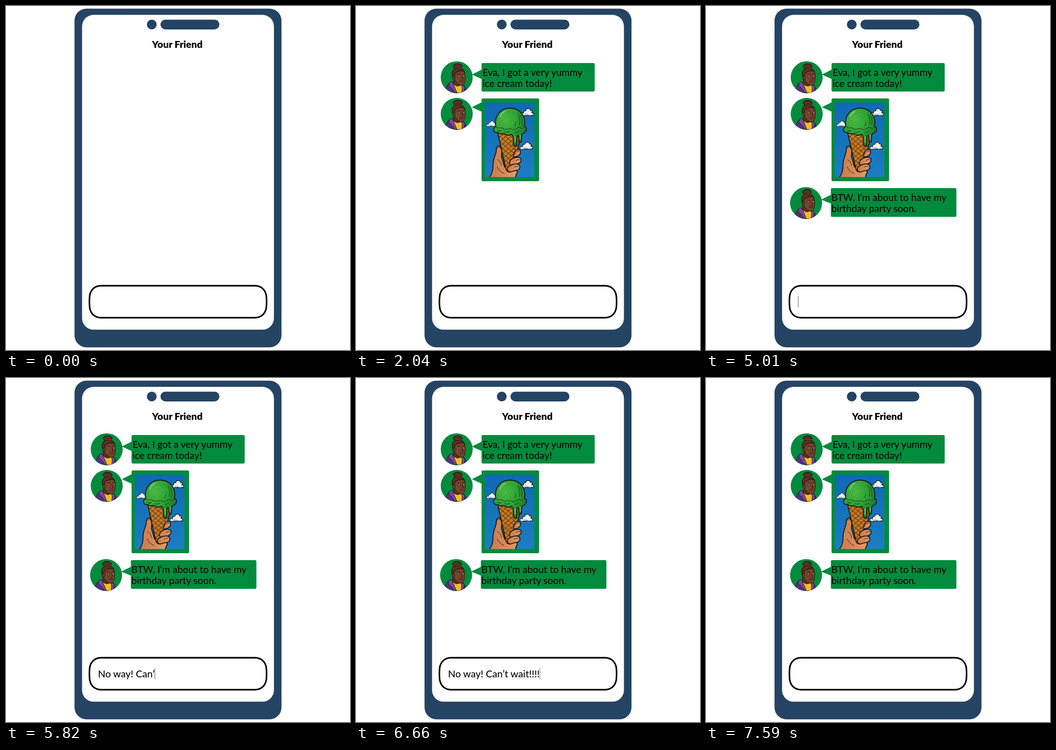
These frames come from a looping animation (748x748 px, 8 s). An HTML page:

```html
<!DOCTYPE html>
<html lang="en">
<head>
<meta charset="utf-8">
<title>Chat</title>
<style>
  html, body { margin: 0; width: 100%; height: 100%; overflow: hidden; background: #fff; }
  svg { display: block; width: 100vw; height: 100vh; }
  text { font: 500 21px Lato, sans-serif; fill: #080808; white-space: pre; }
  .title { font-weight: 900; font-size: 21.3px; text-anchor: middle; fill: #000; }
  .navy { fill: #254463; }
  .green { fill: #038b3d; }
  .ink { stroke: #15100d; stroke-linejoin: round; stroke-linecap: round; }
  .line { fill: none; }
  .message { visibility: hidden; }
  #reply { font-size: 21.3px; }
</style>
</head>
<body>
<svg viewBox="0 0 748 748">
  <defs>
    <clipPath id="disc"><circle r="34.5"/></clipPath>
    <clipPath id="photo"><rect x="280" y="210" width="108" height="162"/></clipPath>
    <linearGradient id="sky" x2="0" y2="1">
      <stop stop-color="#0f69b4"/><stop offset="1" stop-color="#1b7dc2"/>
    </linearGradient>
    <radialGradient id="mint" cx=".35" cy=".3" r=".75">
      <stop stop-color="#4cb944"/><stop offset=".5" stop-color="#2fa236"/><stop offset="1" stop-color="#187427"/>
    </radialGradient>
    <linearGradient id="skin">
      <stop stop-color="#c8794a"/><stop offset="1" stop-color="#e09a68"/>
    </linearGradient>
    <pattern id="waffle" width="8" height="8" patternUnits="userSpaceOnUse" patternTransform="rotate(40) skewX(-8)">
      <rect width="8" height="8" fill="#c57a24"/>
      <path d="M0 0H8M0 0V8" stroke="#573009" stroke-width="2.2"/>
    </pattern>

    <g id="avatar">
      <circle r="34.8" class="green"/>
      <g clip-path="url(#disc)" class="ink" stroke-width=".9">
        <path fill="#4f3479" d="M-26 35C-24 25-22 16-13 10L-7 14 2 33 9 24 11 14C17 17 21 24 22 35Z"/>
        <path fill="#7a489d" d="M-13 10C-18 13-19 19-12 23L-3 34 2 33-7 13ZM11 14 18 21 15 34H10L9 24Z"/>
        <path fill="#f2bd20" d="M-8 13C-3 19 4 20 9 15L12 22 11 34H1Z"/>
        <path fill="#5b2f20" d="M-7 0-8 13C-3 20 4 21 9 16V8Z"/>
        <path fill="#4a261e" d="M-8 2C-13-9-9-18-1-21 8-23 15-19 18-10L8-8Z"/>
        <ellipse cx="2" cy="-24" rx="10" ry="6" fill="#4a261e"/>
        <path fill="#74422b" d="M-4-7C0-13 8-15 16-13L19-4 18 8C17 14 14 18 10 18 4 17-4 10-6 3Z"/>
        <ellipse cx="-6" cy="1" rx="2.6" ry="4" fill="#70402a"/>
        <path class="line" stroke="#8b4b32" d="M-6-23Q1-28 9-24M-4-20Q2-24 11-20M-8-12Q-2-19 9-18M-8-6Q-6-14 4-16"/>
        <path class="line" d="M2-7 8-6M13-7 17-7M12-3 14 3 11 5"/>
        <path fill="#fff" stroke-width=".6" d="M3-3Q6-5 9-2 6 0 3-3M13-3 17-4 16-1Z"/>
        <circle cx="7" cy="-2.5" r=".6" fill="#15100d"/>
        <path fill="#9b4036" stroke-width=".6" d="M7 9Q11 7 15 8 12 12 7 9Z"/>
        <path class="line" stroke="#a05a38" d="M-1 2Q2 8 4 10"/>
      </g>
    </g>

    <g id="cloud" class="ink" stroke-width="1.3">
      <path fill="#f4f3ea" d="M-14 5C-13 1-9 1-8 2-8-3-4-4-3-3-2-10 7-9 7-4 11-5 12 0 10 1 14 1 15 4 14 7H-5C-8 9-12 8-14 5Z"/>
      <path class="line" stroke="#89b9d6" stroke-width="1.5" d="M-8 5Q-2 2 2 5T11 5"/>
    </g>
  </defs>

  <rect class="navy" x="149" y="5.700" width="450" height="736.500" rx="26"/>
  <rect x="165.400" y="19.300" width="417.200" height="684.500" rx="25" fill="#fff"/>
  <circle class="navy" cx="317" cy="40.3" r="10.6"/>
  <rect class="navy" x="336" y="29.700" width="128" height="21.200" rx="10.6"/>
  <text class="title" x="372.5" y="91.3">Your Friend</text>

  <g class="message" data-at="930">
    <use href="#avatar" x="219" y="155"/>
    <path class="green" d="M252 149 274 138V159Z"/>
    <rect class="green" x="273" y="124" width="246" height="62" rx="3"/>
    <text x="275" y="151.5">Eva, I got a very yummy</text>
    <text x="275" y="175.5">ice cream today!</text>
  </g>

  <g class="message" data-at="2040">
    <use href="#avatar" x="219" y="234.6"/>
    <path class="green" d="M252 220 274 209V230Z"/>
    <rect class="green" x="273" y="201" width="125" height="180" rx="3"/>
    <g clip-path="url(#photo)">
      <rect x="280" y="210" width="108" height="162" fill="url(#sky)"/>
      <use href="#cloud" x="372" y="231"/>
      <use href="#cloud" transform="translate(294 256) scale(.75)"/>
      <use href="#cloud" x="370" y="304"/>
      <g class="ink" stroke-width="1.8">
        <path fill="url(#skin)" d="M289 374C297 364 298 355 298 344 298 334 303 325 305 316 304 308 308 302 313 305 318 309 317 320 316 327L323 350 347 354 351 361C348 366 347 370 346 374Z"/>
        <path fill="url(#waffle)" d="M308 275 359 279 343 350C340 363 329 364 326 355Z"/>
        <g fill="url(#skin)">
          <path d="M344 321C345 312 353 309 357 314 360 320 355 326 347 328 342 329 341 325 344 321Z"/>
          <path d="M336 335C342 329 352 327 358 331 361 337 357 343 348 344L339 347C333 346 332 340 336 335Z"/>
          <path d="M331 350C338 344 350 341 355 346 359 352 354 358 345 358L336 361C329 360 327 355 331 350Z"/>
        </g>
        <path class="line" stroke-width="1" d="M307 310Q312 303 315 310M308 334Q315 338 317 347M307 350Q312 361 322 364M346 319Q351 313 355 316M348 336Q354 332 357 335M344 350Q350 347 353 350"/>
        <path fill="url(#mint)" d="M304 262C300 239 314 222 335 222 356 222 371 240 366 261 373 264 372 274 364 277 360 278 360 282 360 291 360 299 354 298 354 291V283C351 280 350 282 350 288V299C350 307 342 307 342 299 343 287 342 280 337 279 331 284 325 279 321 277 313 281 309 275 307 275 298 276 296 266 304 262Z"/>
        <path class="line" stroke="#0f4e1c" stroke-width="1.2" d="M304 261C308 269 314 263 318 265 324 272 331 265 337 267 345 273 351 263 356 264 361 269 367 264 366 261M308 270Q312 274 316 270M323 273Q329 276 334 272M345 274Q350 276 354 271M357 237Q363 247 360 258M352 234Q358 246 355 258M348 252 345 261"/>
        <path class="line" stroke="#9fdc86" stroke-width="1.4" d="M313 242Q316 233 324 229M346 284V297M357 281V290"/>
        <path class="line" stroke="#17651f" stroke-width="1.2" stroke-dasharray=".1 6" d="M318 250Q326 240 343 238M322 258Q334 246 351 249M329 233Q343 228 352 239"/>
      </g>
    </g>
  </g>

  <g class="message" data-at="3630">
    <use href="#avatar" x="217.6" y="428.5"/>
    <path class="green" d="M250 421 273 410V430Z"/>
    <rect class="green" x="271.5" y="396" width="273" height="62.5" rx="3"/>
    <text x="272.5" y="423.5">BTW, I’m about to have my</text>
    <text x="272.5" y="447.5">birthday party soon.</text>
  </g>

  <path fill="#fff" stroke="#000" stroke-width="3.4" d="M207 608.3H541C555 608.3 564 617 566 630Q567.300 643 566 656C564 669 555 677.700 541 677.700H207C193 677.700 184 669 182 656Q180.700 643 182 630C184 617 193 608.300 207 608.300Z"/>
  <text id="reply" x="200" y="650.5"></text>
  <rect id="caret" y="631" width="1" height="24" fill="#555"/>
</svg>

<script>
const LOOP = 8000, REPLY = 'No way! Can’t wait!!!!';
const CARET_START = 4560, CARET_END = 7200, SENT = 7590;
// Typing comes in bursts: first keystroke, time per key, number of keys.
const BURSTS = [[5070, 60, 5], [5430, 60, 8], [6210, 54, 9]];

const reply = document.getElementById('reply');
const caret = document.getElementById('caret');
const messages = document.querySelectorAll('.message');
const clamp = (value, low, high) => Math.min(high, Math.max(low, value));

function typedCount(time) {
  return BURSTS.reduce((sum, [start, pace, keys]) =>
    sum + clamp(Math.floor((time - start) / pace) + 1, 0, keys), 0);
}

// Fade in, hold, fade out, rest: 240 ms each.
function caretOpacity(time) {
  if (time < CARET_START || time >= CARET_END) return 0;
  const phase = ((time - CARET_START) % 960) / 240;
  return clamp(Math.min(phase + 0.1, 3 - phase), 0, 1);
}

function draw(now) {
  const time = now % LOOP;
  for (const message of messages) {
    message.style.visibility = time >= +message.dataset.at ? 'visible' : 'hidden';
  }
  const text = time < SENT ? REPLY.slice(0, typedCount(time)) : '';
  if (reply.textContent !== text) reply.textContent = text;
  caret.setAttribute('x', 200 + (text ? reply.getComputedTextLength() : 0));
  caret.setAttribute('opacity', caretOpacity(time));
}

const origin = performance.now();
function tick() {
  draw(performance.now() - origin);
  requestAnimationFrame(tick);
}
tick();
</script>
</body>
</html>
```
